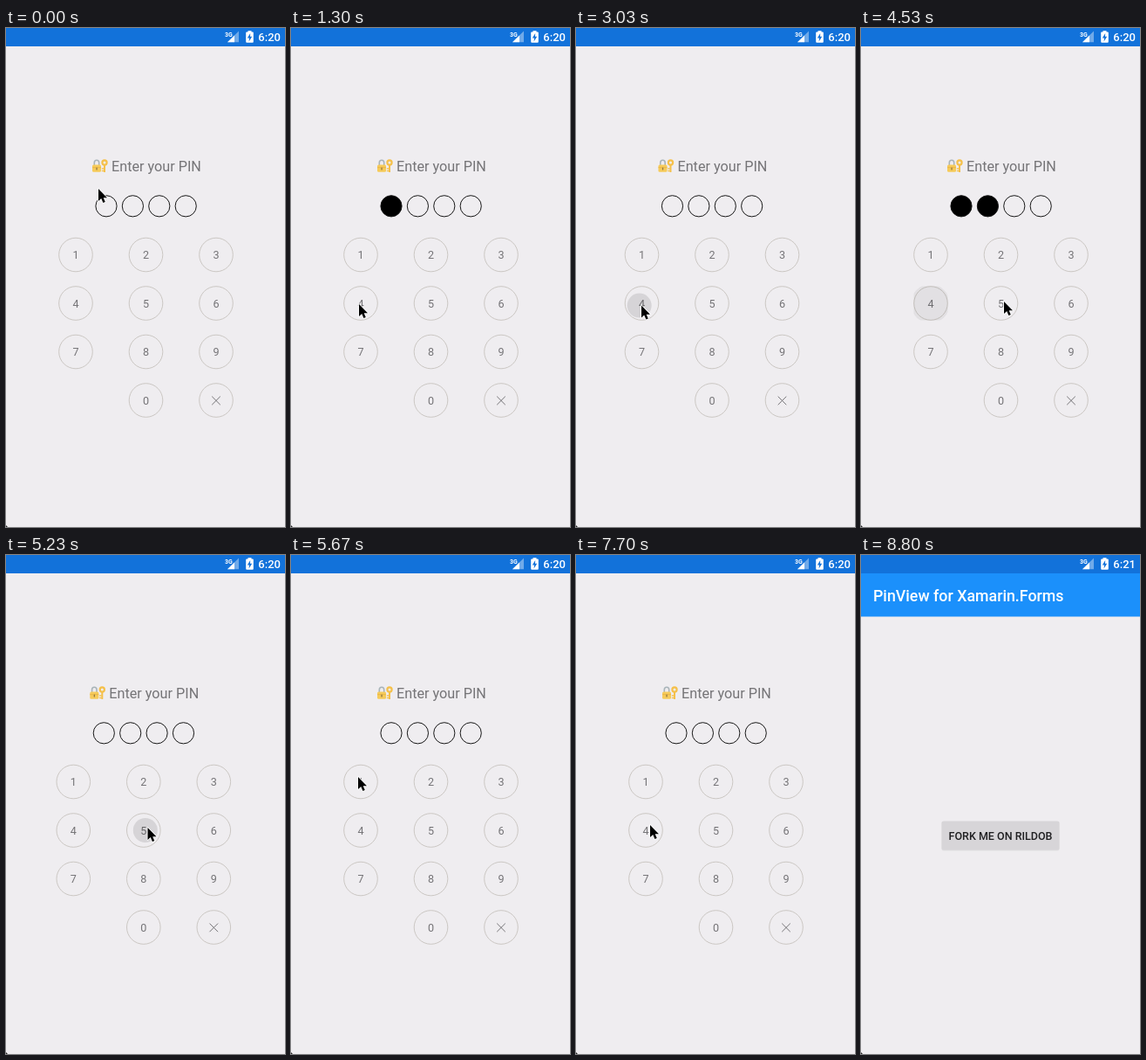
These frames come from a looping animation (320x571 px, 8830 ms). An HTML page with a canvas:

```html
<!DOCTYPE html>
<html lang="en">
<head>
<meta charset="utf-8">
<title>PIN entry</title>
<style>
html, body { margin: 0; width: 100%; height: 100%; overflow: hidden; background: #efedf0; }
canvas { display: block; width: 100vw; height: 100vh; }
</style>
</head>
<body>
<canvas id="stage"></canvas>
<script>
const W = 320, H = 571, LOOP = 8830;
const canvas = document.getElementById('stage');
const ctx = canvas.getContext('2d');
const dpr = window.devicePixelRatio || 1;
canvas.width = Math.round(W * dpr);
canvas.height = Math.round(H * dpr);

const BG = '#efedf0', BAR = '#1272da', TOOLBAR = '#1b90fb';
const KEYS = ['1', '2', '3', '4', '5', '6', '7', '8', '9', '', '0', 'x'];

// cursor stops: time, x, y
const PATH = [
  [0, 106, 184], [250, 106, 184], [620, 77, 262], [1000, 77, 262],
  [1250, 78, 316], [1550, 78, 316], [1900, 77, 371], [2230, 77, 371],
  [2330, 81, 336], [2480, 76, 318], [2800, 75, 317.5], [4250, 75, 317],
  [4500, 164, 313], [5200, 164, 313], [5600, 77, 254], [5850, 77, 254],
  [6120, 160, 260], [6300, 160, 260], [6580, 244, 262], [6800, 244, 262],
  [7210, 85, 309], [7740, 85, 309], [7980, -16, 300]
];
// taps: time, key
const TAPS = [
  [730, '1'], [1420, '4'], [2200, '7'], [2800, '4'],
  [3700, '4'], [4200, '4'], [4620, '5'], [5000, '5'],
  [5700, '1'], [6180, '2'], [6650, '3'], [7240, '4']
];
const CLEARS = [2970, 5150, 7450];
const SHAKES = [2970, 5150];

const clamp = v => Math.max(0, Math.min(1, v));
const smooth = u => u * u * (3 - 2 * u);
const mix = (a, b, u) => a + (b - a) * u;

function cursorAt(t) {
  const i = PATH.findIndex(p => p[0] > t);
  if (i < 0) return PATH[PATH.length - 1].slice(1);
  const a = PATH[i - 1], b = PATH[i];
  const u = smooth((t - a[0]) / (b[0] - a[0]));
  return [mix(a[1], b[1], u), mix(a[2], b[2], u)];
}

function keyCenter(key) {
  const i = KEYS.indexOf(key);
  return [80 + (i % 3) * 80.5, 259.5 + Math.floor(i / 3) * 55.5];
}

function filledDots(t) {
  const since = Math.max(0, ...CLEARS.filter(c => c <= t));
  return TAPS.filter(p => p[0] >= since && p[0] <= t).length;
}

function shakeAt(t) {
  const start = SHAKES.find(s => t >= s && t < s + 500);
  return start === undefined ? 0 : -4.8 * Math.sin((t - start) / 100 * Math.PI);
}

function text(str, x, y, font, color, align = 'left') {
  ctx.font = font + ' Roboto, sans-serif';
  ctx.fillStyle = color;
  ctx.textAlign = align;
  ctx.fillText(str, x, y);
}

function rect(x, y, w, h, color, r = 0) {
  ctx.fillStyle = color;
  ctx.beginPath();
  ctx.roundRect(x, y, w, h, r);
  ctx.fill();
}

function poly(color, ...pts) {
  ctx.fillStyle = color;
  ctx.beginPath();
  for (let i = 0; i < pts.length; i += 2) ctx.lineTo(pts[i], pts[i + 1]);
  ctx.closePath();
  ctx.fill();
}

function circle(x, y, r) {
  ctx.beginPath();
  ctx.arc(x, y, r, 0, Math.PI * 2);
}

function strokeWith(color, width) {
  ctx.strokeStyle = color;
  ctx.lineWidth = width;
  ctx.stroke();
}

function lockAndKey() {
  ctx.beginPath();
  ctx.moveTo(101.3, 158);
  ctx.lineTo(101.3, 154.5);
  ctx.arc(104, 154, 2.7, Math.PI, 0);
  ctx.lineTo(106.7, 158);
  strokeWith('#a9b4b9', 1.6);
  rect(99, 156.6, 10, 8.2, '#f6cb5a', 1.5);
  rect(99, 159.2, 10, 1, '#e9b747');
  rect(103.4, 159.5, 1.3, 3, '#8f7747', 0.6);
  circle(113, 154, 2.6);
  strokeWith('#f5c04a', 2.2);
  rect(112, 156.5, 2, 8.5, '#f5c04a', 0.6);
  rect(109.8, 160.2, 2.5, 1.4, '#f5c04a');
  rect(109.8, 162.8, 2.5, 1.4, '#f5c04a');
}

function ripple(t, [start, key]) {
  const age = t - start;
  if (age < 0 || age > 430) return;
  const [kx, ky] = keyCenter(key);
  const [px, py] = cursorAt(start);
  const u = clamp(age / 350);
  ctx.save();
  ctx.beginPath();
  ctx.rect(kx - 19.5, ky - 19.5, 39, 39);
  ctx.clip();
  circle(mix(px, kx, u * u), mix(py + 2, ky, u * u), 24 * Math.pow(u, 1.3));
  ctx.fillStyle = `rgba(0,0,0,${0.23 * (1 - age / 430)})`;
  ctx.fill();
  ctx.restore();
}

function pinPage(t) {
  rect(0, 21, W, H - 21, BG);
  ctx.save();
  ctx.translate(shakeAt(t), 0);
  lockAndKey();
  text('Enter your PIN', 121, 163.7, '16.2px', '#757477');

  const filled = filledDots(t);
  for (let i = 0; i < 4; i++) {
    circle(115 + i * 30.4, 203.8, 12.1);
    if (i < filled) {
      ctx.fillStyle = '#000';
      ctx.fill();
    }
    strokeWith('#161616', 1);
  }

  for (const key of KEYS) {
    if (!key) continue;
    const [x, y] = keyCenter(key);
    circle(x, y, 19.3);
    strokeWith('#cbc7c3', 1);
    if (key === 'x') {
      ctx.beginPath();
      ctx.moveTo(x - 4.8, y - 4.4);
      ctx.lineTo(x + 4.8, y + 5.2);
      ctx.moveTo(x + 4.8, y - 4.4);
      ctx.lineTo(x - 4.8, y + 5.2);
      strokeWith('#757477', 1);
    } else {
      text(key, x, y + 4.6, '12.6px', '#757477', 'center');
    }
  }
  TAPS.forEach(tap => ripple(t, tap));
  ctx.restore();
}

function homePage() {
  rect(0, 21, W, H - 21, BG);
  rect(0, 21, W, 49.5, TOOLBAR);
  text('PinView for Xamarin.Forms', 14, 52.6, '500 17.8px', '#fff');
  rect(92.5, 305, 135, 33.5, 'rgba(0,0,0,0.06)', 2);
  rect(92.5, 304.5, 135, 33, '#d7d5d8', 2);
  text('FORK ME ON RILDOB', 160, 325.6, '500 12.5px', '#202022', 'center');
}

function statusBar(t) {
  rect(0, 0, W, 21, BAR);
  text('3G', 251, 9.6, '700 7px', '#fff');
  poly('rgba(255,255,255,0.4)', 254, 16.3, 267, 16.3, 267, 3.6);
  poly('#fff', 254, 16.3, 262, 16.3, 262, 8.4);
  rect(277.5, 3.2, 4, 3, '#fff');
  rect(275.2, 4.6, 8.6, 12.2, '#fff', 1);
  poly(BAR, 280.2, 6, 276.8, 11.6, 279, 11.6, 278.6, 15.6, 282.2, 9.8, 280, 9.8);
  text(t < 8300 ? '6:20' : '6:21', 289.3, 15, '500 13px', '#fff');
}

function cursor(t) {
  const [x, y] = cursorAt(t);
  ctx.save();
  ctx.translate(x, y);
  ctx.beginPath();
  const pts = [0, 0, 0, 14, 3.2, 11.1, 5.4, 16, 7.8, 15, 5.7, 10.2, 10, 10.2];
  for (let i = 0; i < pts.length; i += 2) ctx.lineTo(pts[i], pts[i + 1]);
  ctx.closePath();
  ctx.lineJoin = 'round';
  strokeWith('#fff', 1.6);
  ctx.fillStyle = '#000';
  ctx.fill();
  ctx.restore();
}

function draw(now) {
  const t = now % LOOP;
  const slide = clamp((t - 7740) / 300);
  ctx.setTransform(canvas.width / W, 0, 0, canvas.height / H, 0, 0);
  if (slide > 0) homePage();
  if (slide < 1) {
    ctx.save();
    ctx.translate(0, slide * slide * (H - 21));
    pinPage(t);
    ctx.restore();
  }
  statusBar(t);
  cursor(t);
  poly('#222', 0, 569, 0, 571, 2, 571);
}

const begin = performance.now();
function tick() {
  draw(performance.now() - begin);
  requestAnimationFrame(tick);
}
tick();
</script>
</body>
</html>
```
